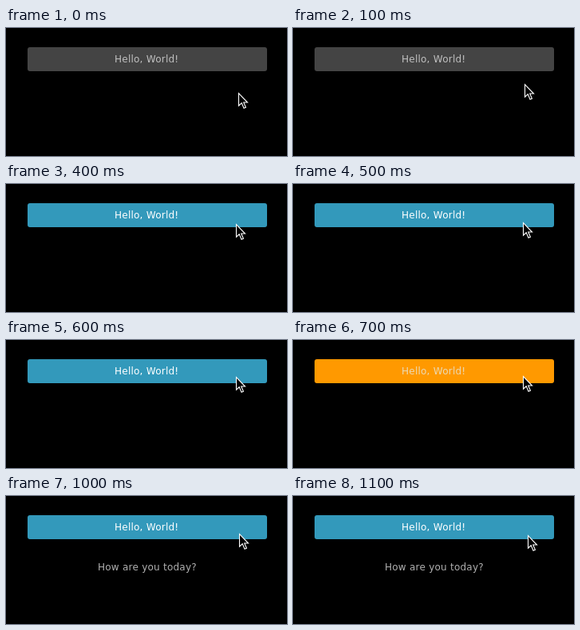
Recreate the animation shown at these times as an HTML page. Size 352x160 px, loop 1.2 s.

```html
<!DOCTYPE html>
<html lang="en">
<head>
<meta charset="utf-8">
<title>Button states</title>
<style>
  html, body { margin: 0; width: 100%; height: 100%; overflow: hidden; background: #000; }
  svg { display: block; }
  text { font: 12px "DejaVu Sans", sans-serif; letter-spacing: .24px; }
</style>
</head>
<body>
<svg width="352" height="160" viewBox="0 0 352 160">
  <rect width="352" height="160" fill="#000"/>
  <rect id="button" x="27" y="24" width="300" height="30" rx="3"/>
  <text id="label" x="136" y="43">Hello, World!</text>
  <text id="reply" x="115" y="93" fill="#b0b0b0">How are you today?</text>
  <path id="cursor" d="M.5 .5V16.2L4.2 12.8L7 19.2L9.4 18.2L6.7 12H11.5Z"
        fill="#000" stroke="#fff" stroke-width="1.1"/>
</svg>
<script>
const STEP = 100;
const STEPS = 12;
const styles = {
  idle: { fill: '#444444', text: '#c0c0c0' },
  hover: { fill: '#3399bb', text: '#ffffff' },
  pressed: { fill: '#ff9900', text: '#ead9b4' }
};
// Cursor tip at each step
const tips = [
  [291, 81], [290, 70], [289, 59], [288, 51], [288, 50], [288, 48],
  [288, 46], [288, 45], [288, 45], [289, 45], [292, 47], [294, 49]
];
const [button, label, reply, cursor] =
  ['button', 'label', 'reply', 'cursor'].map(id => document.getElementById(id));

function stateAt(step) {
  if (step < 4) return styles.idle;
  return step === 7 ? styles.pressed : styles.hover;
}

function render(time) {
  const step = Math.floor(time / STEP) % STEPS;
  const state = stateAt(step);
  button.setAttribute('fill', state.fill);
  label.setAttribute('fill', state.text);
  reply.setAttribute('visibility', step >= 8 ? 'visible' : 'hidden');
  cursor.setAttribute('transform', `translate(${tips[step]})`);
}

const start = performance.now();
function tick() {
  render(performance.now() - start);
  requestAnimationFrame(tick);
}
tick();
</script>
</body>
</html>
```
